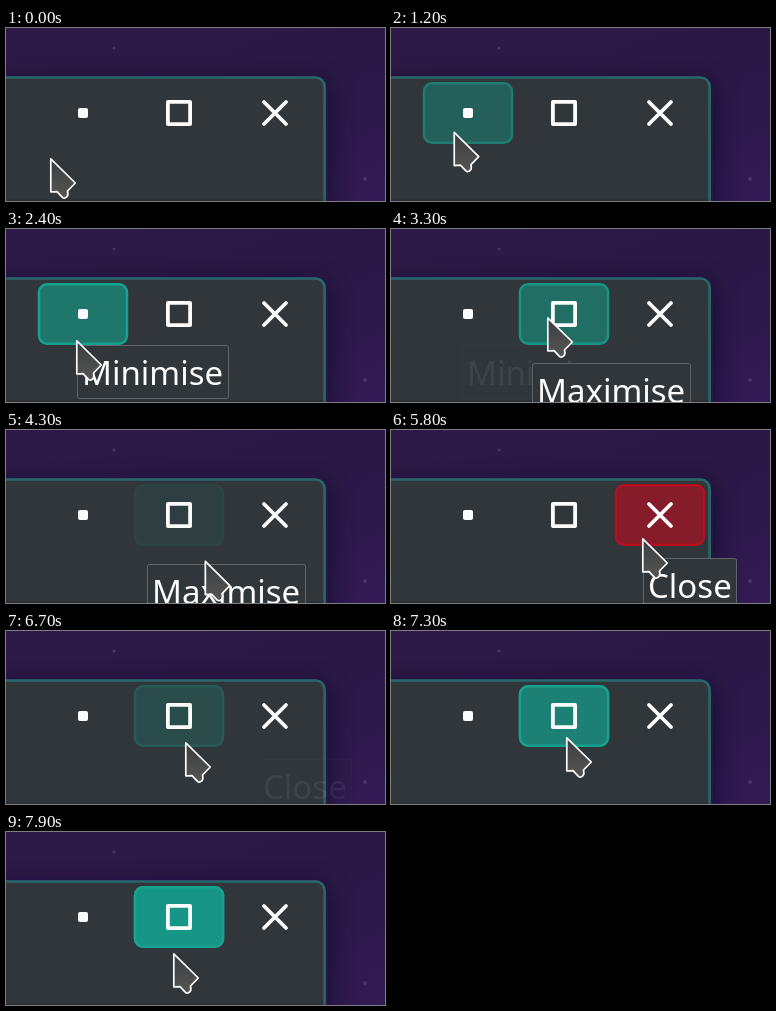
Write an HTML page that moves like this. It is 379 by 173 pixels and loops after 8 s.

```html
<!DOCTYPE html>
<html lang="en">
<head>
<meta charset="utf-8">
<title>Window buttons</title>
<style>
  html, body { margin: 0; width: 100%; height: 100%; overflow: hidden; background: #2b1947; }
  svg { display: block; width: 100vw; height: 100vh; }
  text { font: 33px "Noto Sans", "Open Sans", sans-serif; fill: #fcfcfc; }
</style>
</head>
<body>
<svg viewBox="0 0 379 173">
  <defs>
    <linearGradient id="sky" x1="0" y1="0" x2="1" y2="1">
      <stop offset="0" stop-color="#2e1a48"/>
      <stop offset=".5" stop-color="#2a1845"/>
      <stop offset="1" stop-color="#321a54"/>
    </linearGradient>
    <linearGradient id="arrow" x1="0" y1="0" x2="0" y2="1">
      <stop offset="0" stop-color="#3a3d40"/>
      <stop offset="1" stop-color="#565553"/>
    </linearGradient>
    <filter id="blur" x="-20%" y="-20%" width="140%" height="140%">
      <feGaussianBlur stdDeviation="13"/>
    </filter>
  </defs>

  <rect width="379" height="173" fill="url(#sky)"/>
  <circle cx="108" cy="20" r="1.5" fill="#493665"/>
  <circle cx="359" cy="151" r="2" fill="#4a3368"/>
  <rect x="-80" y="56" width="402" height="220" rx="10" fill="#0d0a1c" opacity=".6" filter="url(#blur)"/>

  <rect x="-20" y="49.5" width="338.6" height="160" rx="9" fill="#31363b" stroke="#28686d" stroke-width="2.6"/>
  <rect y="171.5" width="317.3" height="2" fill="#2a2e32"/>

  <g id="buttons"></g>
  <g fill="none" stroke="#fcfcfc" stroke-width="3.8">
    <rect x="72" y="80" width="10" height="10" rx="2" fill="#fcfcfc" stroke="none"/>
    <rect x="161.9" y="73.9" width="22.2" height="22.2" stroke-linejoin="round"/>
    <path d="M258 74l22 22m0-22l-22 22" stroke-linecap="round"/>
  </g>
  <g id="tips"></g>
  <path id="cursor" d="M.8 .8L25.3 25L17.5 33Q18.5 37 17 38.7Q14.5 41 12.7 39.6L7 33.6L.8 34Z"
        fill="url(#arrow)" stroke="#fcfcfc" stroke-width="1.7" stroke-linejoin="round"/>
</svg>

<script>
const LOOP = 8000, STEP = 100;
const BUTTON_FADE = 400, TIP_FADE = 300;
const TEAL = "#14a38e", RED = "#b80f20";
const $ = id => document.getElementById(id);
const clamp = u => Math.min(1, Math.max(0, u));
const ease = u => u * u * (3 - 2 * u);
const fades = [];

function add(parent, tag, attrs = {}, text = "") {
  const el = document.createElementNS("http://www.w3.org/2000/svg", tag);
  for (const key in attrs) el.setAttribute(key, attrs[key]);
  el.textContent = text;
  return parent.appendChild(el);
}

function highlight(center, fill, stroke, on, off = Infinity) {
  const el = add($("buttons"), "rect", {
    x: center - 44, y: 55.2, width: 88, height: 59.6, rx: 8, fill, stroke, "stroke-width": 2.5
  });
  fades.push({ el, on, off, span: BUTTON_FADE });
}

function tooltip(x, y, width, label, on, off) {
  const el = add($("tips"), "g");
  add(el, "rect", { x: x + .5, y: y + .5, width: width - 1, height: 53, rx: 2, fill: "#31363b", stroke: "#5f6468" });
  add(el, "text", { x: x + 5, y: y + 40 }, label);
  fades.push({ el, on, off, span: TIP_FADE });
}

highlight(77, "#1f766b", TEAL, 1000, 2700);
highlight(173, "#1f766b", TEAL, 3000, 4000);
highlight(173, "#1f766b", TEAL, 6600);
highlight(173, "#179687", TEAL, 7200);
highlight(269, "#861b29", RED, 4600, 5900);

tooltip(71, 116, 152, "Minimise", 1600, 3050);
tooltip(141, 134, 159, "Maximise", 3000, 4400);
tooltip(252, 128, 94, "Close", 4800, 6450);

// Each move leads on from the one before; sag bows its path downwards.
const home = { x: 44, y: 130 };
const moves = [
  { from: 700, to: 1400, x: 67, y: 97, sag: 0 },
  { from: 2200, to: 2400, x: 70, y: 111, sag: 0 },
  { from: 2600, to: 3300, x: 156, y: 88, sag: 32 },
  { from: 3900, to: 4760, x: 251, y: 108, sag: 34 },
  { from: 5800, to: 6700, x: 179, y: 111, sag: 30 },
  { from: 6700, to: 6900, x: 175, y: 106, sag: 0 },
  { from: 7700, to: 7900, x: 167, y: 121, sag: 0 }
];

// Quick start and soft landing, the same way in and out.
function opacity({ on, off, span }, t) {
  const rise = 1 - (1 - clamp((t - on) / span)) ** 1.5;
  const fall = (1 - clamp((t - off) / span)) ** 1.5;
  return rise * fall;
}

function cursorAt(t) {
  let { x, y } = home;
  for (const move of moves) {
    const u = ease(clamp((t - move.from) / (move.to - move.from)));
    x += (move.x - x) * u;
    y += (move.y - y) * u + move.sag * 4 * u * (1 - u);
  }
  return [x, y];
}

function draw(now) {
  const t = Math.floor((now % LOOP) / STEP) * STEP;
  for (const fade of fades) fade.el.setAttribute("opacity", opacity(fade, t));
  $("cursor").setAttribute("transform", `translate(${cursorAt(t)})`);
}

function tick() {
  draw(performance.now());
  requestAnimationFrame(tick);
}
tick();
</script>
</body>
</html>
```
